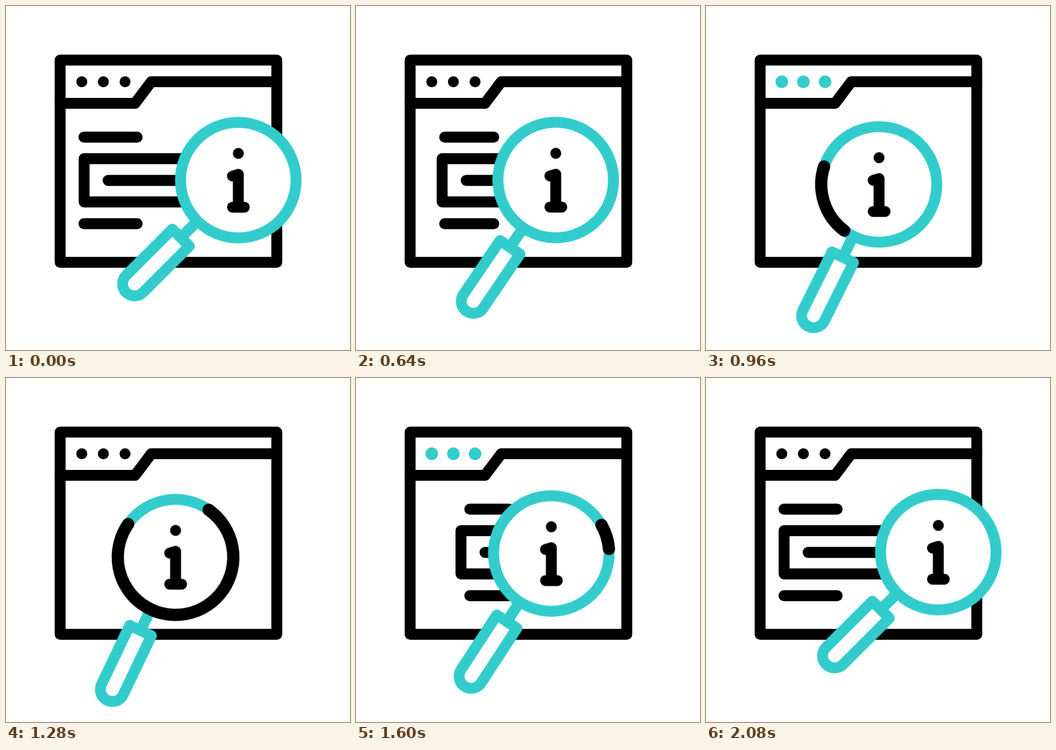
Recreate the animation shown at these times as an HTML page. Size 640 px wide and 640 px high, loop 2440 ms.

```html
<!DOCTYPE html>
<html lang="en">
<head>
<meta charset="utf-8">
<title>Searching for information</title>
<style>
  html, body { margin: 0; width: 100%; height: 100%; overflow: hidden; background: #fff; }
  svg {
    --loop: 2440ms infinite;
    --ease: cubic-bezier(.33, 0, .67, 1);
    display: block; width: 100%; height: 100%;
    fill: none; stroke: #000; stroke-width: 20.3;
    stroke-linecap: round; stroke-linejoin: round;
  }
  .dot { fill: #000; stroke: none; }
  .teal { stroke: #3cc; }
  .white { fill: #fff; }

  /* Dots light up one after another, three times */
  .lit { fill: #3cc; stroke: none; opacity: 0; animation: blink var(--loop) step-end; }
  .lit:nth-of-type(2) { animation-delay: 80ms; }
  .lit:nth-of-type(3) { animation-delay: 160ms; }
  @keyframes blink {
    0%, 15.984%, 42.213%, 68.443%, 100% { opacity: 0; }
    3.279%, 29.508%, 55.738% { opacity: 1; }
  }

  /* Form lines slide behind the lens and back */
  .form path { animation: var(--loop) var(--ease); }
  .form .bar1 { animation-name: bar1; }
  .form .bar2 { animation-name: bar2; }
  .form .bar3 { animation-name: bar3; }
  .form .box { animation-name: box; }
  @keyframes bar1 {
    0%, 21.721%, 75.082%, 100% { d: path("M145 244H244"); }
    39.344%, 57.459% { d: path("M265 244H318"); }
  }
  @keyframes bar2 {
    0%, 21.721%, 75.082%, 100% { d: path("M190 324.5H360"); }
    39.344%, 57.459% { d: path("M280 324.5H330"); }
  }
  @keyframes bar3 {
    0%, 21.721%, 75.082%, 100% { d: path("M145 405H244"); }
    39.344%, 57.459% { d: path("M265 405H318"); }
  }
  @keyframes box {
    0%, 21.721%, 75.082%, 100% { d: path("M145.3 284H400V364.5H145.3Z"); }
    39.344%, 57.459% { d: path("M235.3 284H370V364.5H235.3Z"); }
  }

  /* The glass swings about the end of its handle; the letter stays upright */
  .glass { animation: swing var(--loop); }
  .letter { animation: upright var(--loop); }
  @keyframes swing {
    0% { transform: translate(239.3px, 516.9px) rotate(-45deg); animation-timing-function: var(--ease); }
    16.393% { transform: translate(249.5px, 503px) rotate(-42.4deg); animation-timing-function: cubic-bezier(.335, 0, 0, 1); }
    50.205% { transform: translate(198px, 579.5px) rotate(-64.5deg); }
    56.352% { transform: translate(198px, 579.5px) rotate(-64.5deg); animation-timing-function: cubic-bezier(.33, 0, .33, 1); }
    85.246%, 100% { transform: translate(239.3px, 516.9px) rotate(-45deg); }
  }
  @keyframes upright {
    0% { transform: rotate(45deg); animation-timing-function: var(--ease); }
    16.393% { transform: rotate(42.4deg); animation-timing-function: cubic-bezier(.335, 0, 0, 1); }
    50.205% { transform: rotate(64.5deg); }
    56.352% { transform: rotate(64.5deg); animation-timing-function: cubic-bezier(.33, 0, .33, 1); }
    85.246%, 100% { transform: rotate(45deg); }
  }

  /* Dark arc runs round the rim while it turns slowly */
  .spin { animation: spin var(--loop) linear; }
  .arc {
    stroke-width: 22.8; visibility: hidden;
    animation: trim var(--loop) var(--ease), show var(--loop) step-end;
  }
  @keyframes spin {
    0%, 32.787% { transform: rotate(252.6deg); }
    68.648%, 100% { transform: rotate(301.3deg); }
  }
  @keyframes trim {
    0%, 32.787% { stroke-dasharray: 0px, 400px; stroke-dashoffset: 0px; }
    52.459% { stroke-dasharray: 270px, 400px; stroke-dashoffset: 0px; }
    68.648%, 100% { stroke-dasharray: 0px, 400px; stroke-dashoffset: -270px; }
  }
  @keyframes show {
    0%, 68.648%, 100% { visibility: hidden; }
    32.787% { visibility: visible; }
  }
</style>
</head>
<body>
<svg viewBox="0 0 640 640">
  <path d="M100.7 100.7H503.8V476.8H100.7Z"/>
  <path d="M100.7 181.2H240L270.3 140.8H503.8"/>
  <g class="dot">
    <circle cx="141" cy="141" r="10.2"/>
    <circle cx="181.2" cy="141" r="10.2"/>
    <circle cx="221.5" cy="141" r="10.2"/>
  </g>
  <g>
    <circle class="lit" cx="141" cy="141" r="11.7"/>
    <circle class="lit" cx="181.2" cy="141" r="11.7"/>
    <circle class="lit" cx="221.5" cy="141" r="11.7"/>
  </g>

  <g class="form">
    <path class="bar1" d="M145 244H244"/>
    <path class="box" d="M145.3 284H400V364.5H145.3Z"/>
    <path class="bar2" d="M190 324.5H360"/>
    <path class="bar3" d="M145 405H244"/>
  </g>

  <g class="glass">
    <g class="teal">
      <path d="M121.5 0H165"/>
      <path class="white" d="M121.5 -22.4H0A22.4 22.4 0 0 0 0 22.4H121.5Z"/>
      <circle class="white" cx="272.8" r="107.5"/>
    </g>
    <g transform="translate(272.8 0)">
      <g class="spin">
        <path class="arc" pathLength="360" d="M107.5 0A107.5 107.5 0 0 0 -107.5 0A107.5 107.5 0 0 0 107.5 0"/>
      </g>
      <g class="letter">
        <circle class="dot" cy="-49.8" r="10.2"/>
        <path d="M-10.8 -7.6L0 -10.8V50.3M-10.8 50.3H11.2"/>
      </g>
    </g>
  </g>
</svg>
</body>
</html>
```
